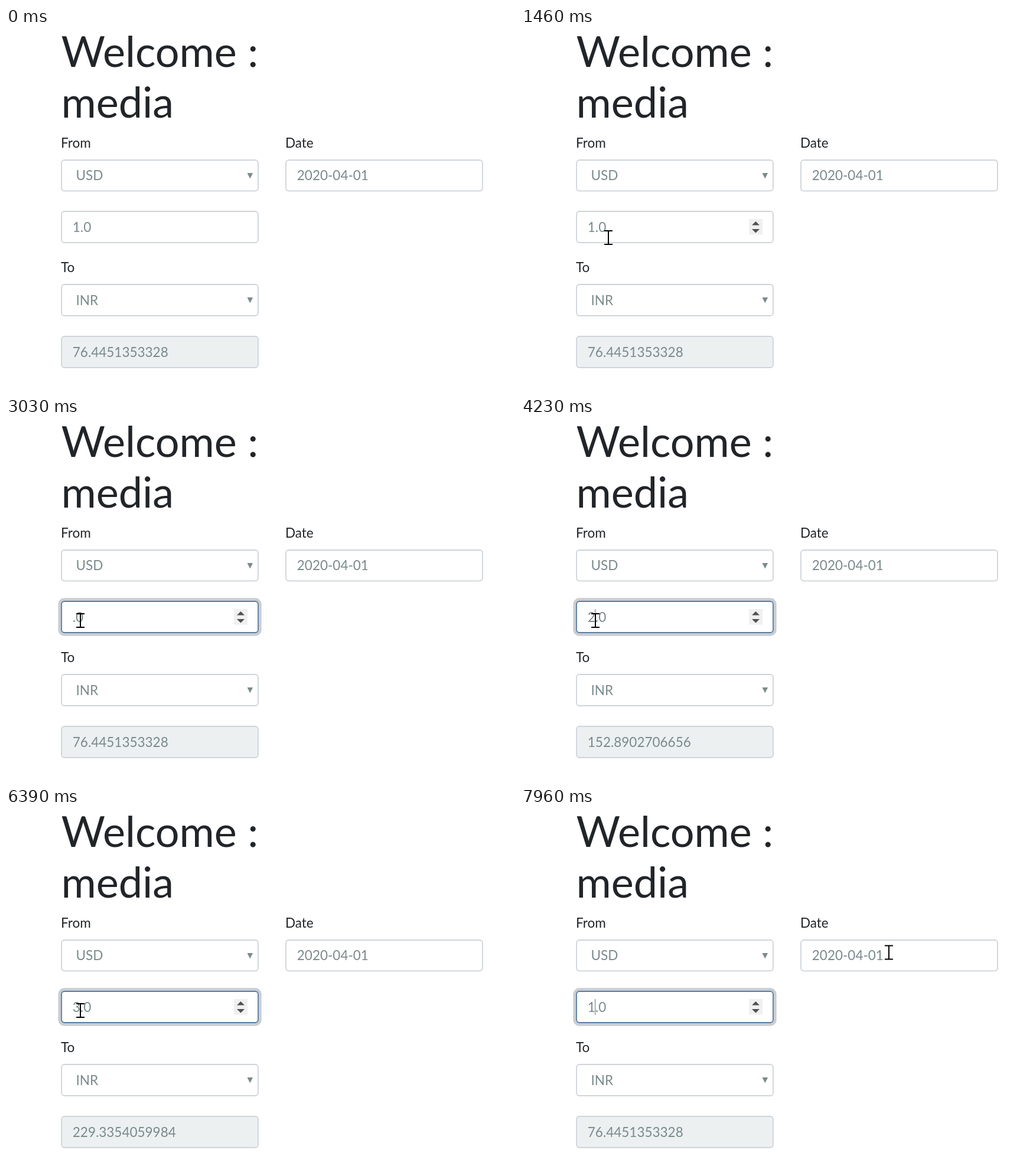
An HTML page for the animation above (8000 ms loop, 862 by 614 pixels).

```html
<!DOCTYPE html>
<html lang="en">
<head>
<meta charset="utf-8">
<title>Currency form</title>
<style>
html, body { margin: 0; width: 100%; height: 100%; overflow: hidden; background: #fff; }
svg { display: block; width: 862px; height: 614px; font: 22.5px Lato, sans-serif; fill: #212529; }
h1, .title { font-size: 72px; }
.value { fill: #7b8a8b; }
.box { fill: #fff; stroke: #ced4da; stroke-width: 1.8; }
</style>
</head>
<body>
<svg viewBox="0 0 862 614">
  <text class="title" x="93.5" y="66">Welcome :</text>
  <text class="title" x="93.5" y="152">media</text>
  <text x="93" y="203">From</text>
  <text x="473" y="203">Date</text>
  <text x="93" y="414">To</text>

  <rect id="ring" fill="#2c3e50" fill-opacity=".25"/>
  <rect class="box" x="94" y="224" width="333" height="52.3" rx="5"/>
  <rect class="box" x="474" y="224" width="333" height="52.3" rx="5"/>
  <rect class="box" id="field" x="94" y="311" width="333" height="53" rx="5"/>
  <rect class="box" x="94" y="435" width="333" height="53" rx="5"/>
  <rect class="box" x="94" y="523" width="333" height="53" rx="5" style="fill:#ecf0f1"/>

  <g class="value">
    <text x="118.5" y="258">USD</text>
    <text x="492.8" y="258">2020-04-01</text>
    <text x="118.5" y="470">INR</text>
    <text id="amount" x="112.8" y="346"></text>
    <text id="result" x="112.8" y="558"></text>
    <path d="M408.5 246h9.6l-4.8 9.6zM408.5 457h9.6l-4.8 9.6z"/>
    <rect id="caret" x="125" y="324" width="1.2" height="27"/>
  </g>

  <g id="spinner">
    <rect x="386" y="324" width="23" height="26.5" fill="#f0f0f0"/>
    <path d="M391 334.5l6.5-6.5 6.5 6.5zM391 341l6.5 6.500 6.500-6.500z" fill="#505050"/>
  </g>

  <path id="arrow" d="M0 0V24.500L5.600 19.200 9.200 27.500 12.700 26 9.200 17.800H17Z" fill="#fff" stroke="#000" stroke-width="1.2"/>
  <path id="beam" d="M-7-11.500H7M0-11.500V11.500M-7 11.500H7" fill="none" stroke="#000" stroke-width="2"/>
</svg>
<script>
const el = id => document.getElementById(id);
const show = (id, on) => el(id).style.display = on ? "" : "none";
const LOOP = 8000;

// [time, value] lists: the last entry already reached applies
const amounts = [[0, "1.0"], [3030, ".0"], [3180, "2.0"], [4710, ".0"], [4790, "3.0"], [6540, ".0"], [6610, "1.0"]];
const results = [[0, "76.4451353328"], [3250, "152.8902706656"], [4860, "229.3354059984"], [6610, "0.0"], [6770, "76.4451353328"]];
const blinks = [[0, false], [2310, true], [2880, false], [3180, true], [3730, false], [4230, true], [4710, false],
  [4790, true], [5360, false], [5840, true], [6390, false], [6610, true], [7190, false], [7690, true]];
const at = (list, t) => list.findLast(e => e[0] <= t)[1];

// Pointer paths: [step, x, y]
const enter = [[0, 666, 583], [2, 575, 546], [5, 372, 448], [8, 215, 373], [10, 165, 358],
  [14, 148, 355.5], [18, 136, 349], [21, 128, 344.5], [22, 126, 343.5]];
const leave = [[0, 140, 338], [2, 240, 309], [4, 390, 268], [6, 540, 236], [7, 595, 234], [8, 623, 245]];

function along(path, step) {
  const last = path[path.length - 1];
  if (step >= last[0]) return last.slice(1);
  const i = path.findIndex(p => p[0] > step);
  const a = path[i - 1], b = path[i], u = (step - a[0]) / (b[0] - a[0]);
  return [a[1] + (b[1] - a[1]) * u, a[2] + (b[2] - a[2]) * u];
}

function pointer(t) {
  return t < 7340 ? along(enter, Math.floor((t - 390) / 76.8 + .1))
                  : along(leave, Math.floor((t - 7340) / 77.5 + .05));
}

const within = (x, y, left, top) => x > left && x < left + 335 && y > top && y < top + 54;

function draw(t) {
  el("amount").textContent = at(amounts, t);
  el("result").textContent = at(results, t);
  show("caret", at(blinks, t));

  const focus = t < 2310 ? 0 : Math.min(1, (Math.floor((t - 2310) / 80) + 1) / 4);
  const mix = (a, b) => a + (b - a) * focus;
  const spread = 4.8 * focus;
  const ring = { x: 93.1 - spread, y: 310.1 - spread, width: 334.8 + 2 * spread,
    height: 54.8 + 2 * spread, rx: 6 + spread, "fill-opacity": .25 * focus };
  for (const k in ring) el("ring").setAttribute(k, ring[k]);
  el("field").style.stroke = `rgb(${mix(206, 89)},${mix(212, 126)},${mix(218, 162)})`;

  const visible = t >= 390;
  const [x, y] = visible ? pointer(t) : [0, 0];
  const overAmount = within(x, y, 93, 310);
  const text = overAmount || within(x, y, 473, 223);
  show("arrow", visible && !text);
  show("beam", visible && text);
  show("spinner", focus || overAmount);
  el(text ? "beam" : "arrow").setAttribute("transform", `translate(${x} ${y})`);
}

function tick() {
  draw(performance.now() % LOOP);
  requestAnimationFrame(tick);
}
tick();
</script>
</body>
</html>
```
